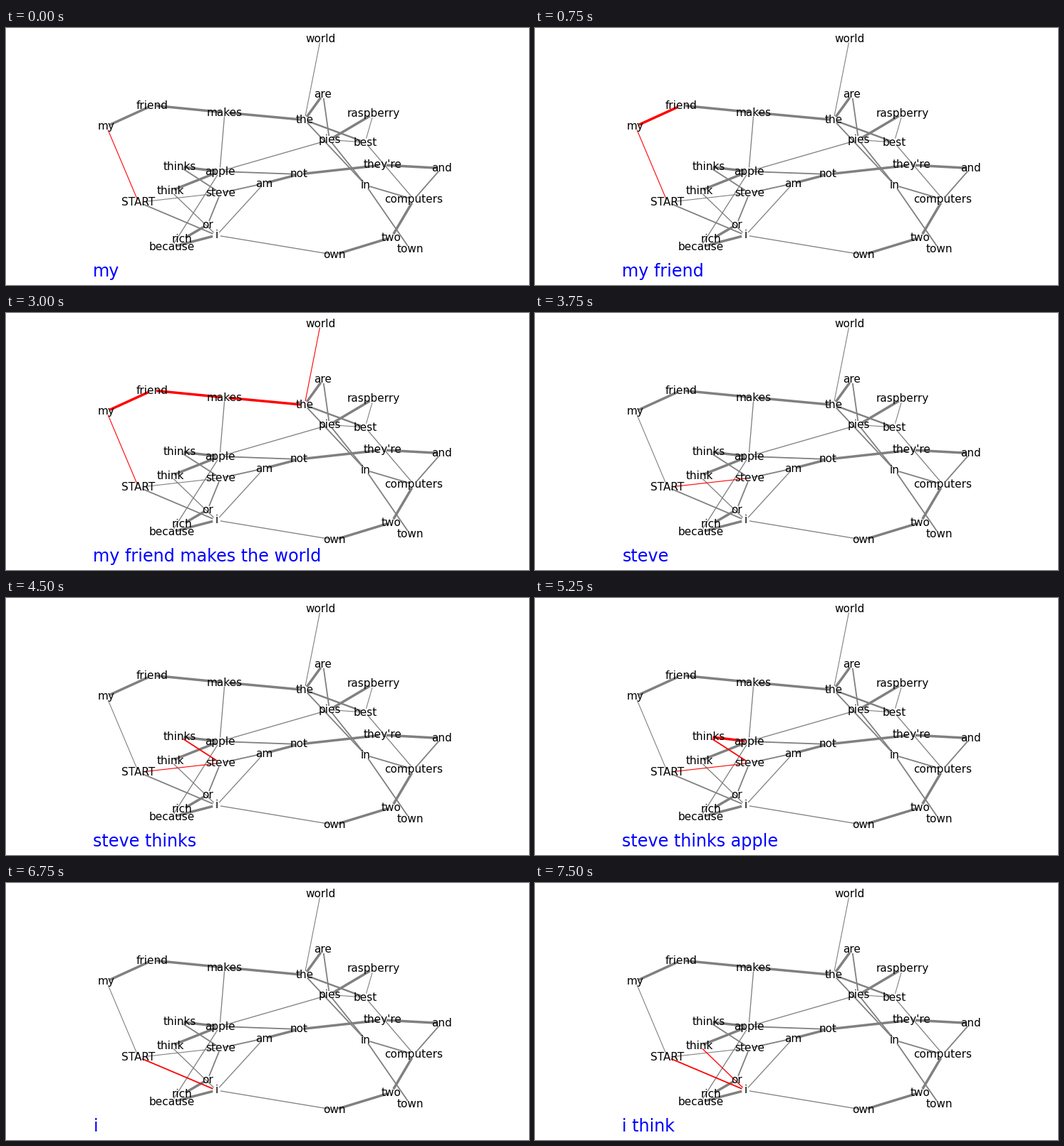
These frames come from a looping animation (734x362 px, 8 s). A matplotlib script:

```python
import math

import matplotlib.pyplot as plt
from matplotlib.animation import FuncAnimation

W, H, DPI = 734, 362, 100
PT = 72 / DPI          # points per pixel
GAP = 5.5              # space between a node's centre and its edges
INTERVAL, STEP = 250, 3
FRAMES = 32

NODES = {
    "world": (441.5, 15), "are": (445, 93.5), "raspberry": (515.5, 121),
    "the": (419, 129.5), "pies": (454, 157.5), "best": (504, 161),
    "they're": (528.5, 193), "and": (611, 197.5), "computers": (572.5, 241.5),
    "in": (505, 221.5), "two": (541, 295), "town": (567, 311.5),
    "own": (461, 319.5), "not": (411.5, 206), "am": (362, 219),
    "apple": (300, 202), "steve": (301, 232.5), "thinks": (244, 195.5),
    "think": (231, 229.5), "START": (186, 245.5), "or": (283, 277),
    "rich": (247, 298), "i": (295.5, 292), "because": (232.5, 308.5),
    "my": (141, 138.5), "friend": (205.5, 109), "makes": (307, 119),
}

# Edges grouped by line width in pixels
EDGES = {
    1.1: "START-my START-steve the-world raspberry-best pies-best",
    1.3: "makes-apple apple-pies best-computers own-i am-i think-i "
         "apple-because",
    1.8: "START-i the-in are-pies pies-in in-computers in-town apple-not "
         "and-computers steve-am steve-thinks steve-or",
    2.4: "the-best",
    3.5: "my-friend friend-makes makes-the the-are raspberry-pies "
         "they're-and not-they're am-not computers-two two-own "
         "thinks-apple think-apple or-rich because-i",
}

SENTENCES = ["my friend makes the world", "steve thinks apple pies", "i think"]


def prefixes(sentence):
    words = sentence.split()
    return [words[:n] for n in range(1, len(words) + 1)]


STATES = [p for s in SENTENCES for p in prefixes(s)]

fig = plt.figure(figsize=(W / 100, H / 100), dpi=DPI, facecolor="white")
ax = fig.add_axes([0, 0, 1, 1])
ax.set_xlim(0, W)
ax.set_ylim(H, 0)
ax.axis("off")
plt.rcParams["font.family"] = "DejaVu Sans"


def add_edge(a, b, width):
    (x0, y0), (x1, y1) = NODES[a], NODES[b]
    d = math.hypot(x1 - x0, y1 - y0)
    dx, dy = GAP * (x1 - x0) / d, GAP * (y1 - y0) / d
    line, = ax.plot([x0 + dx, x1 - dx], [y0 + dy, y1 - dy], color="gray",
                    lw=width * PT, solid_capstyle="butt", zorder=1)
    return line


lines = {}
for width, pairs in EDGES.items():
    for pair in pairs.split():
        a, b = pair.split("-")
        lines[frozenset((a, b))] = add_edge(a, b, width)

for word, (x, y) in NODES.items():
    ax.text(x, y, word, fontsize=15.3 * PT, color="black",
            ha="center", va="center", zorder=3)

caption = ax.text(122.3, 350, "", fontsize=23.9 * PT, color="blue",
                  ha="left", va="baseline", zorder=3)


def update(frame):
    words = STATES[frame // STEP]
    path = ["START"] + words
    walked = {frozenset(p) for p in zip(path, path[1:])}
    for pair, line in lines.items():
        line.set_color("red" if pair in walked else "gray")
        line.set_zorder(2 if pair in walked else 1)
    caption.set_text(" ".join(words))
    return [*lines.values(), caption]


anim = FuncAnimation(fig, update, frames=FRAMES, interval=INTERVAL,
                     repeat=True, repeat_delay=0, blit=False)
plt.show()
```
